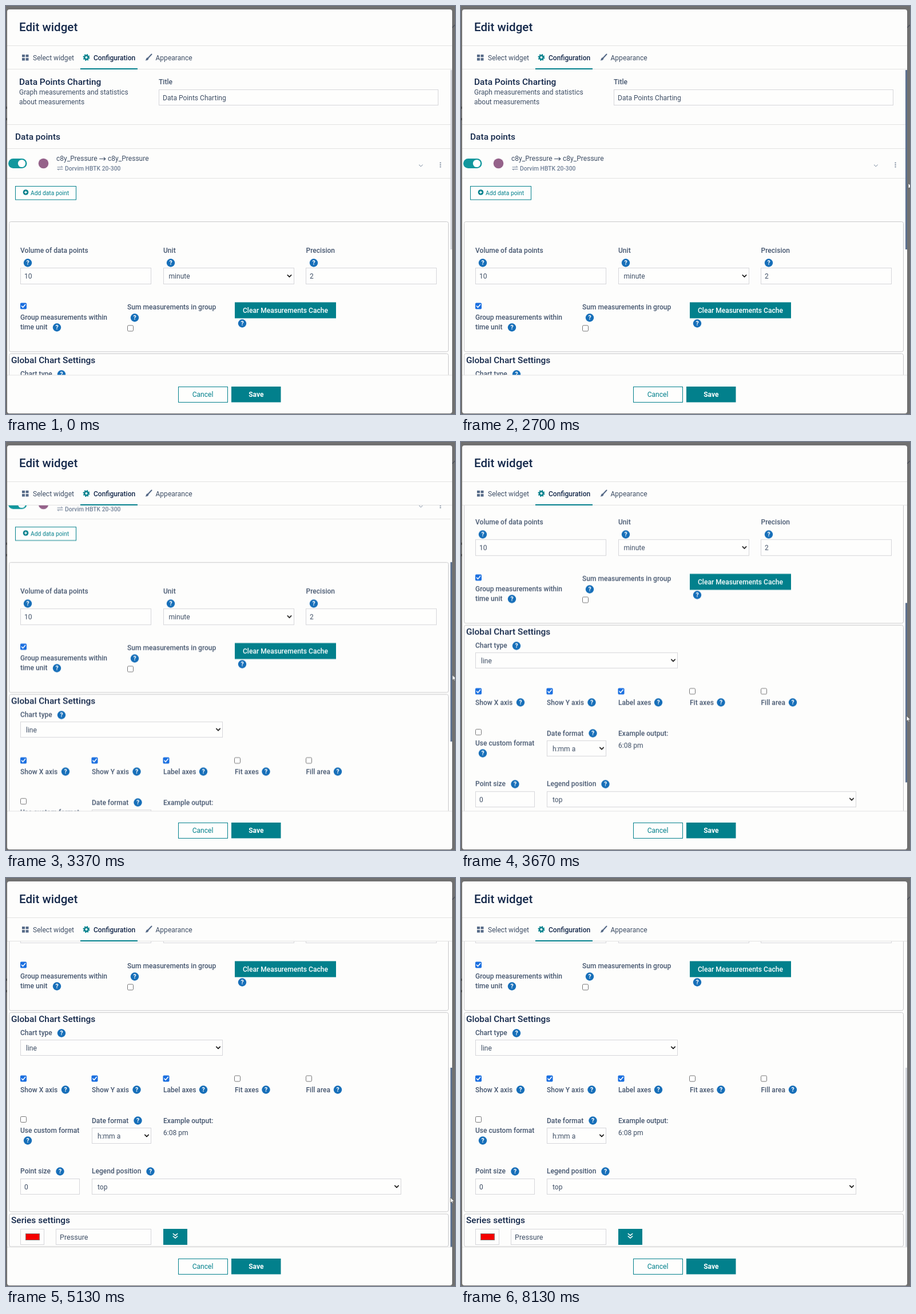
Recreate the animation shown at these times as an HTML page. Size 785x714 px, loop 8.16 s.

```html
<!DOCTYPE html>
<html lang="en">
<head>
<meta charset="utf-8">
<title>Edit widget</title>
<style>
  html, body { margin: 0; width: 100%; height: 100%; overflow: hidden; background: #707070; }
  svg { display: block; width: 785px; height: 714px; }
  text { font: 400 12.05px Roboto, Arial, sans-serif; fill: #3f4f66; white-space: pre; }
  .h1 { font-size: 20.64px; font-weight: 500; fill: #14284a; }
  .h2 { font-size: 15.48px; font-weight: 500; fill: #14284a; }
  .label { font-weight: 500; fill: #45566f; }
  .small { font-size: 10.32px; }
  .muted { font-weight: 500; fill: #6f7f96; }
  .teal { fill: #02808c; }
  .white { fill: #fff; font-weight: 500; }
  .mid { text-anchor: middle; }
  .rule { stroke: #e2e2e2; }
  .card { fill: none; stroke: #c9c9cb; }
  .field { fill: #fefefd; stroke: #d6d6da; }
  .outline { fill: #fefefd; stroke: #02808c; }
  .line { fill: none; stroke-linecap: round; stroke-linejoin: round; }

  .scroll, .thumb, .cursor { animation: 8160ms linear infinite; }
  .scroll { animation-name: scroll; }
  .thumb { animation-name: thumb, hover; animation-duration: 8160ms; }
  .cursor { animation-name: cursor; }

  @keyframes scroll {
    0%, 33.7% { transform: translateY(0); }
    37.13% { transform: translateY(-29px); }
    44.98% { transform: translateY(-287.5px); }
    47.6%, 100% { transform: translateY(-373px); }
  }
  @keyframes thumb {
    0%, 33.7% { transform: translateY(0); }
    37.13% { transform: translateY(17px); }
    44.98% { transform: translateY(169.5px); }
    47.6%, 100% { transform: translateY(220px); }
  }
  @keyframes hover {
    0%, 14.5% { fill: #d3d6dc; }
    14.51%, 94.8% { fill: #5d7190; }
    94.81%, 100% { fill: #d3d6dc; }
  }
  @keyframes cursor {
    0%, 14% { transform: translate(790px, 330px); }
    18.4%, 25% { transform: translate(759px, 311px); }
    30%, 33.7% { transform: translate(782px, 310px); }
    37.13% { transform: translate(782px, 326px); }
    44.98% { transform: translate(779px, 479px); }
    47.6% { transform: translate(778px, 530px); }
    50.8%, 63% { transform: translate(777px, 559px); }
    68%, 93.7% { transform: translate(780px, 561px); }
    95.6%, 100% { transform: translate(800px, 572px); }
  }
</style>
</head>
<body>
<svg viewBox="0 0 785 714">
  <defs>
    <clipPath id="view"><rect x="2" y="111" width="775" height="534.5"/></clipPath>
    <g id="help">
      <circle r="7.2" fill="#176fb9"/>
      <text class="white mid" y="3.8" style="font-size:10.5px;font-weight:700">?</text>
    </g>
    <rect id="off" x="-5" y="-5" width="10" height="10" rx="1.8" fill="#fff" stroke="#767676"/>
    <g id="on">
      <rect x="-5.5" y="-5.5" width="11" height="11" rx="1.8" fill="#1a6fe0"/>
      <path class="line" d="M-3 .2 -1 2.4 3.2-2.6" stroke="#fff" stroke-width="1.6"/>
    </g>
    <path id="down" class="line" d="M-3.2-1.6 0 1.6 3.2-1.6" stroke="#1c1c1c" stroke-width="1.7"/>
  </defs>

  <!-- Page behind the dialog -->
  <rect width="785" height="714" fill="#707070"/>
  <path d="M0 178h2M0 198h2" stroke="#4c4c4c" stroke-width="4"/>
  <path d="M780 38 785 33" stroke="#4a4e58" stroke-width="1.3"/>
  <rect x="2" y="6" width="778" height="707" rx="4" fill="#fdfdfc"/>

  <!-- Header and tabs -->
  <text class="h1" x="23" y="44">Edit widget</text>
  <path class="rule" d="M2 69.5h778M2 110.5h778"/>
  <path d="M28 85h5v4.5h-5zM34.5 85h5v4.5h-5zM28 91h5v4.5h-5zM34.5 91h5v4.5h-5z" fill="#566a87"/>
  <text x="47" y="94.5">Select widget</text>
  <g fill="none" stroke="#02808c" transform="translate(140.5 90)">
    <circle r="3.3" stroke-width="2.6"/>
    <circle r="5" stroke-width="2" stroke-dasharray="1.96 1.967"/>
  </g>
  <text class="label" x="153" y="94.5" style="fill:#14284a">Configuration</text>
  <path d="M130 110h100" stroke="#02808c" stroke-width="2"/>
  <path d="M254.5 84.5 248.5 91" class="line" stroke="#566a87" stroke-width="2"/>
  <path d="M247 90.2q2.6.4 2.3 2.6-1.6 3.2-6 2.4 1.6-.8 1.7-2.8.5-1.9 2-2.2z" fill="#566a87"/>
  <text x="261.5" y="94.5">Appearance</text>

  <g clip-path="url(#view)">
    <g class="scroll">
      <!-- Title -->
      <text class="h2" x="23" y="138">Data Points Charting</text>
      <text x="23" y="155">Graph measurements and statistics</text>
      <text x="23" y="172">about measurements</text>
      <text class="label" x="267" y="137">Title</text>
      <rect class="field" x="267.5" y="146.5" width="488" height="27"/>
      <text x="274" y="164.5">Data Points Charting</text>
      <path class="rule" d="M2 207.5h775M2 249.5h775M2 301.5h775"/>

      <!-- Data points -->
      <text class="h2" x="16" y="233.5">Data points</text>
      <rect x="4" y="267" width="32.5" height="17" rx="8.5" fill="#12979d"/>
      <circle cx="27.5" cy="275.5" r="6.6" fill="#fff"/>
      <circle cx="65.5" cy="275.5" r="8.8" fill="#95628a"/>
      <text x="88" y="271">c8y_Pressure</text>
      <path class="line" d="M163.5 267.5h10M171 265l2.8 2.5-2.8 2.5" stroke="#3f4f66" stroke-width="1.1"/>
      <text x="178" y="271">c8y_Pressure</text>
      <path class="line" d="M90 282h8.5M96.7 280.2l2 1.8M99 285.5h-8.7M92 287.3l-2-1.8" stroke="#6f7f96"/>
      <text class="small muted" x="103" y="287.5">Dorvim HBTK 20-300</text>
      <path class="line" d="M722.3 278l3 2.8 3-2.8" stroke="#6f7f96"/>
      <path d="M759.5 273.5v2M759.5 277v2M759.5 280.5v2" stroke="#7d8a9c" stroke-width="2"/>
      <rect class="outline" x="16.5" y="315.5" width="106" height="23.5"/>
      <circle cx="34.5" cy="326" r="4.8" fill="#02808c"/>
      <path d="M32 326h5M34.5 323.5v5" stroke="#fff" stroke-width="1.3"/>
      <text class="small teal" x="43" y="330.8">Add data point</text>

      <!-- Measurement settings -->
      <rect class="card" x="5.5" y="377.5" width="768" height="227.5" rx="3"/>
      <text class="label" x="25" y="432">Volume of data points</text>
      <text class="label" x="275" y="432">Unit</text>
      <text class="label" x="524.5" y="432">Precision</text>
      <use href="#help" x="38" y="449.5"/>
      <use href="#help" x="288" y="449.5"/>
      <use href="#help" x="538" y="449.5"/>
      <rect class="field" x="25.5" y="458.5" width="228" height="28"/>
      <rect class="field" x="275.5" y="458.5" width="228" height="28"/>
      <rect class="field" x="524.5" y="458.5" width="228" height="28"/>
      <text x="32" y="477">10</text>
      <text x="284.5" y="477">minute</text>
      <use href="#down" x="495.5" y="472.5"/>
      <text x="531" y="477">2</text>
      <use href="#on" x="30.5" y="525"/>
      <text class="label" x="25" y="549">Group measurements within</text>
      <text class="label" x="25" y="566">time unit</text>
      <use href="#help" x="89" y="562.5"/>
      <text class="label" x="212" y="531">Sum measurements in group</text>
      <use href="#help" x="225" y="545.5"/>
      <use href="#off" x="217.5" y="564"/>
      <rect class="teal" x="400" y="518.5" width="177" height="28"/>
      <text class="white" x="414" y="537">Clear Measurements Cache</text>
      <use href="#help" x="413" y="555.5"/>

      <!-- Global chart settings -->
      <rect class="card" x="5.5" y="608.5" width="768" height="348.5" rx="3"/>
      <text class="h2" x="9" y="625.3">Global Chart Settings</text>
      <text class="label" x="25" y="648.3">Chart type</text>
      <use href="#help" x="97" y="644.5"/>
      <rect class="field" x="25.5" y="656.5" width="353" height="27"/>
      <text x="35" y="674.5">line</text>
      <use href="#down" x="371" y="670"/>
      <use href="#on" x="30.5" y="724"/>
      <use href="#on" x="155" y="724"/>
      <use href="#on" x="280" y="724"/>
      <use href="#off" x="404.5" y="724"/>
      <use href="#off" x="529.5" y="724"/>
      <text class="label" x="25" y="747.5">Show X axis</text>
      <text class="label" x="150" y="747.5">Show Y axis</text>
      <text class="label" x="275" y="747.5">Label axes</text>
      <text class="label" x="400" y="747.5">Fit axes</text>
      <text class="label" x="524.5" y="747.5">Fill area</text>
      <use href="#help" x="104" y="743.5"/>
      <use href="#help" x="228.5" y="743.5"/>
      <use href="#help" x="345" y="743.5"/>
      <use href="#help" x="454.5" y="743.5"/>
      <use href="#help" x="580" y="743.5"/>
      <use href="#off" x="30.5" y="795.5"/>
      <text class="label" x="25" y="818.5">Use custom format</text>
      <use href="#help" x="38" y="832.5"/>
      <text class="label" x="150" y="801.5">Date format</text>
      <use href="#help" x="230.5" y="797.5"/>
      <rect class="field" x="150.5" y="810.5" width="103" height="27"/>
      <text x="160" y="828.5">h:mm a</text>
      <use href="#down" x="246" y="824"/>
      <text class="label" x="275" y="801.5">Example output:</text>
      <text x="275" y="822.5">6:08 pm</text>
      <text class="label" x="25" y="890.3">Point size</text>
      <use href="#help" x="94.5" y="886.5"/>
      <rect class="field" x="25.5" y="899.5" width="103" height="27"/>
      <text x="32" y="917.5">0</text>
      <text class="label" x="150" y="890.3">Legend position</text>
      <use href="#help" x="252.5" y="886.5"/>
      <rect class="field" x="150.5" y="899.5" width="540" height="27"/>
      <text x="160" y="917.5">top</text>
      <use href="#down" x="683" y="913"/>

      <!-- Series settings -->
      <rect class="card" x="5.5" y="961" width="768" height="57" rx="3"/>
      <text class="h2" x="9" y="977.3">Series settings</text>
      <rect class="field" x="25.5" y="987.5" width="41" height="27"/>
      <rect x="34.5" y="995.5" width="24" height="11" fill="#f40000" stroke="#8a7070"/>
      <rect class="field" x="87.5" y="987.5" width="166" height="27"/>
      <text x="94" y="1005.7" style="font-size:12.6px">Pressure</text>
      <rect class="teal" x="275" y="987" width="42" height="28"/>
      <path class="line" d="M292.3 995.5l3.7 3.2 3.7-3.2M292.3 1000l3.7 3.2 3.7-3.2" stroke="#fff" stroke-width="1.6"/>
    </g>
  </g>

  <rect class="thumb" x="777" y="112" width="3" height="314" fill="#d3d6dc"/>

  <!-- Footer -->
  <path class="rule" d="M2 646h778"/>
  <rect class="outline" x="301.5" y="666.5" width="86" height="27"/>
  <text class="teal mid" x="344" y="684.3">Cancel</text>
  <rect class="teal" x="394" y="666" width="86.5" height="27.5"/>
  <text class="white mid" x="437.3" y="684.3" style="font-weight:700">Save</text>

  <path class="cursor" d="M0 0v9.6l2.2-2 1.5 3.3 1.5-.7-1.5-3.2h3z" fill="#fff" stroke="#555" stroke-width=".8"/>
</svg>
</body>
</html>
```
